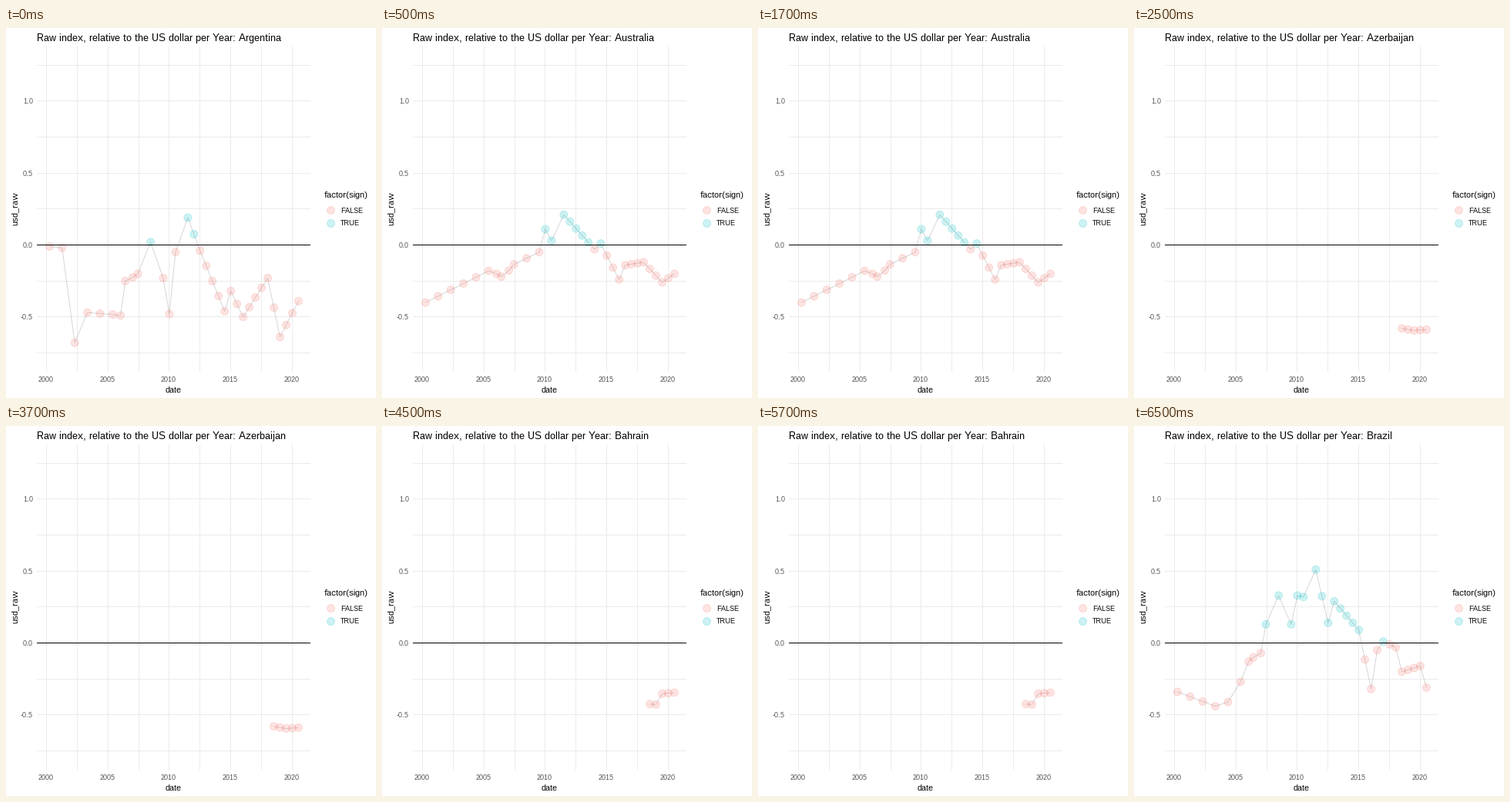
Write a matplotlib script that moves like this. It is 480 px wide and 480 px high and loops after 8000 ms.

```python
import numpy as np
import matplotlib.pyplot as plt
from matplotlib.animation import FuncAnimation

# Full hinting on whole pixels gives crisp small text
plt.rcParams.update({
    "font.family": "Liberation Sans",
    "text.hinting": "native",
    "text.hinting_factor": 1,
})

SIZE, DPI = 480, 72
STEP_MS, STEPS, STEPS_PER_COUNTRY = 500, 16, 4
LEFT, RIGHT, TOP, BOTTOM = 40, 395, 24, 446
GRID, TICK = "#EBEBEB", "#4D4D4D"
NEGATIVE, POSITIVE = "#F8766D", "#00BFC4"
POINT = dict(s=10 ** 2, alpha=0.2, linewidths=1, snap=False)

# Yearly surveys with two extra ones, then half-yearly with one gap
half_years = np.arange(2010, 2021, 0.5)
DATES = np.sort(np.concatenate([
    np.linspace(2000.25, 2009.5, 10),
    [2006.03, 2007.03],
    half_years[half_years != 2011],
]))

# Turning points of each index by survey number, straight in between
TURNS = {
    "Argentina": {0: -.01, 1: -.02, 2: -.68, 3: -.47, 6: -.49, 7: -.25,
                  9: -.2, 10: .02, 12: -.48, 13: -.05, 14: .19, 16: -.04,
                  20: -.46, 21: -.32, 23: -.5, 27: -.23, 29: -.64, 32: -.39},
    "Australia": {0: -.4, 5: -.18, 7: -.22, 11: -.05, 12: .11, 13: .03,
                  14: .21, 19: -.03, 20: .01, 23: -.24, 24: -.14, 27: -.12,
                  30: -.26, 32: -.2},
    "Azerbaijan": {28: -.58, 30: -.595, 32: -.588},
    "Bahrain": {28: -.425, 29: -.428, 30: -.353, 32: -.345},
    "Brazil": {0: -.34, 3: -.44, 4: -.41, 6: -.13, 8: -.07, 10: .33,
               11: .13, 12: .33, 13: .32, 14: .51, 16: .14, 17: .29,
               21: .09, 23: -.32, 24: -.05, 25: .01, 27: -.03, 28: -.2,
               31: -.16, 32: -.31},
}
COUNTRIES = list(TURNS)


def x_pos(year):
    return 52.4 + (year - 2000) * 15.95


def y_pos(value):
    return 281.5 - value * 186.6


def pixel_center(position):
    return np.floor(position) + 0.5


def index_values(country):
    turns = TURNS[country]
    surveys = np.arange(min(turns), len(DATES))
    values = np.interp(surveys, list(turns), list(turns.values()))
    return DATES[surveys], values


fig = plt.figure(figsize=(SIZE / DPI, SIZE / DPI), dpi=DPI, facecolor="white")
ax = fig.add_axes([0, 0, 1, 1])
ax.set(xlim=(0, SIZE), ylim=(SIZE, 0))
ax.axis("off")


def label(x, y, text, size, color="black", **kwargs):
    return ax.text(x, y, text, fontsize=size, color=color, **kwargs)


def rule(xs, ys, color, zorder=1):
    ax.plot(xs, ys, color=color, lw=1, zorder=zorder,
            solid_capstyle="butt", snap=False)


for year in np.arange(2000, 2021, 2.5):
    x = pixel_center(x_pos(year))
    rule([x, x], [TOP, BOTTOM], GRID)
    if year % 5 == 0:
        label(x - 0.5, 459, f"{year:.0f}", 9, TICK, ha="center")

for value in np.arange(-0.75, 1.3, 0.25):
    y = pixel_center(y_pos(value))
    rule([LEFT, RIGHT], [y, y], GRID)
    if value % 0.5 == 0:
        label(35, y + 3.5, f"{value:.1f}", 9, TICK, ha="right")

rule([LEFT, RIGHT], [281.5, 281.5], "black", zorder=4)

label(217, 473, "date", 11, ha="center")
label(11.5, 234, "usd_raw", 11, rotation=90, ha="center", va="center")
label(413, 220, "factor(sign)", 11)
for y, name, color in [(236, "FALSE", NEGATIVE), (252.5, "TRUE", POSITIVE)]:
    ax.scatter([420.5], [y], color=color, **POINT)
    label(434, y + 4, name, 9)

title = label(40, 17, "", 13)
path, = ax.plot([], [], color="black", alpha=0.16, lw=1, zorder=2)
points = ax.scatter([], [], zorder=3, **POINT)


def draw(step):
    country = COUNTRIES[(step + 3) // STEPS_PER_COUNTRY]
    dates, values = index_values(country)
    xs, ys = x_pos(dates), y_pos(values)
    title.set_text(f"Raw index, relative to the US dollar per Year: {country}")
    path.set_data(xs, ys)
    points.set_offsets(np.column_stack([xs, ys]))
    points.set_color(np.where(values > 0, POSITIVE, NEGATIVE))
    return title, path, points


animation = FuncAnimation(fig, draw, frames=STEPS, interval=STEP_MS,
                          repeat=True, repeat_delay=0)
plt.show()
```
